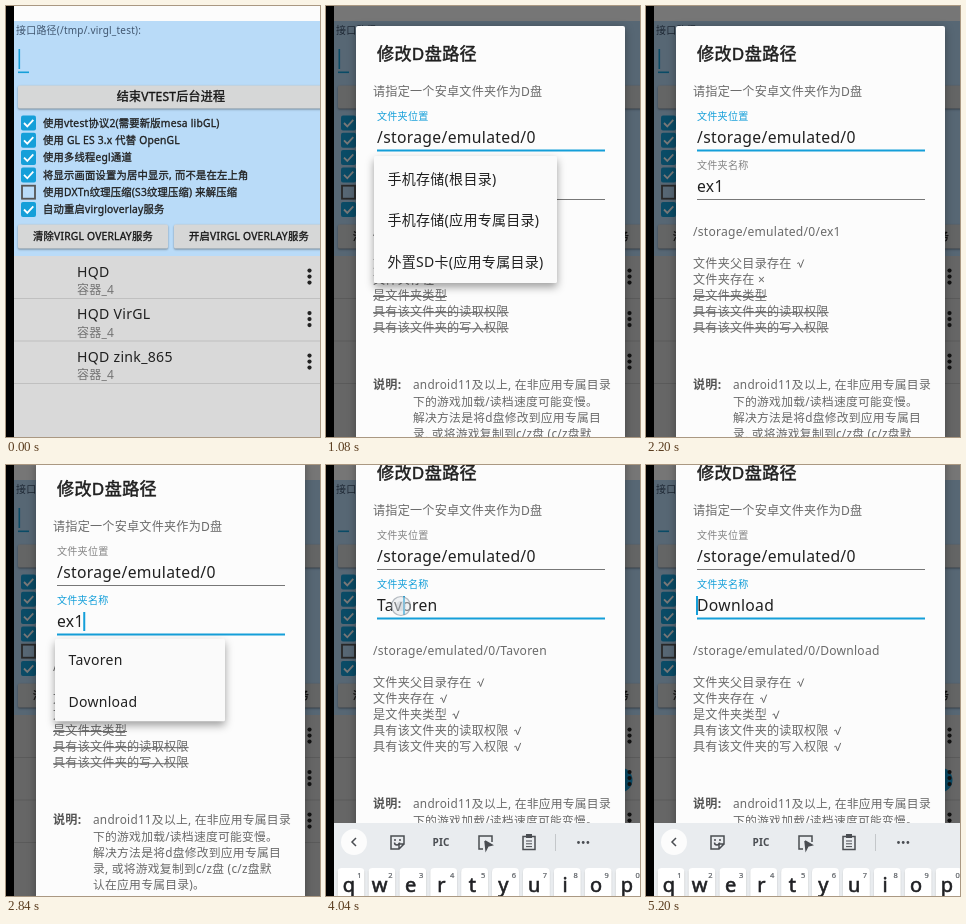
Write an HTML page with a canvas that moves like this. It is 314x431 px and loops after 5360 ms.

```html
<!DOCTYPE html>
<html lang="zh-CN">
<head>
<meta charset="utf-8">
<title>D盘路径</title>
<style>
html, body { margin: 0; width: 100%; height: 100%; overflow: hidden; background: #000; }
canvas { display: block; width: 314px; height: 431px; }
</style>
</head>
<body>
<canvas id="stage"></canvas>
<script>
const W = 314, H = 431, LOOP = 5360, STEP = 40;
const FONT = '"Noto Sans", "Noto Sans CJK SC", "Noto Sans CJK", sans-serif';
const BLUE = '#159fd9', INK = '#202020', GRAY = '#6a6a6a';
const FOLDER = 'Tavoren';
const canvas = document.getElementById('stage');
const dpr = window.devicePixelRatio || 1;
canvas.width = W * dpr;
canvas.height = H * dpr;
const c = canvas.getContext('2d');

const ramp = (t, from, to) => Math.min(1, Math.max(0, (t - from) / (to - from)));
const during = (t, from, to) => t >= from && t < to;

function rect(x, y, w, h, color) {
  c.fillStyle = color;
  c.fillRect(x, y, w, h);
}

function round(x, y, w, h, r, color) {
  c.beginPath();
  c.roundRect(x, y, w, h, r);
  c.fillStyle = color;
  c.fill();
}

function disc(x, y, r, color) {
  c.beginPath();
  c.arc(x, y, r, 0, Math.PI * 2);
  c.fillStyle = color;
  c.fill();
}

function path(points, color, width) {
  c.beginPath();
  points.forEach(([x, y]) => c.lineTo(x, y));
  c.strokeStyle = color;
  c.lineWidth = width;
  c.stroke();
}

// y is the visual middle of the line; weight 500 is thickened by a thin outline
function text(str, x, y, size, color = INK, align = 'left', weight = 400) {
  const base = y + size * 0.37;
  c.font = `${weight} ${size}px ${FONT}`;
  c.letterSpacing = size * 0.02 + 'px';
  c.textAlign = align;
  c.fillStyle = color;
  c.fillText(str, x, base);
  if (weight === 500) {
    c.strokeStyle = color;
    c.lineWidth = size * 0.03;
    c.strokeText(str, x, base);
  }
  return c.measureText(str).width;
}

function shadow(blur, dy, alpha) {
  c.shadowColor = `rgba(0,0,0,${alpha})`;
  c.shadowBlur = blur * dpr;
  c.shadowOffsetY = dy * dpr;
}

function noShadow() {
  c.shadowColor = 'transparent';
}

function button(x, y, w, h, label, size) {
  shadow(2, 1, 0.4);
  round(x, y, w, h, 1.5, '#d6d7d7');
  noShadow();
  text(label, x + w / 2, y + h / 2, size, '#161616', 'center', 500);
}

function checkbox(y, on, label) {
  if (on) {
    round(15, y - 7.5, 15, 15, 2, BLUE);
    path([[18, y], [21.3, y + 3.4], [27.3, y - 3.2]], '#fff', 1.8);
  } else {
    c.strokeStyle = '#555';
    c.lineWidth = 1.8;
    c.strokeRect(16, y - 6.5, 13, 13);
  }
  text(label, 37, y, 10.3, INK, 'left', 500);
}

function drawPage(t) {
  rect(0, 0, W, H, '#000');
  rect(8, 0, W, 15, '#fcfcfc');
  rect(8, 15, W, 235, '#b9dbf8');
  rect(8, 250, W, H, '#d9d9d9');
  text('接口路径(/tmp/.virgl_test):', 10, 24, 10, '#40566f');
  if (t < 3000) rect(12.5, 43, 1.6, 20, BLUE);
  rect(12, 65.5, 11, 1.6, BLUE);
  button(12, 79.5, 306, 23, '结束VTEST后台进程', 12);
  [
    '使用vtest协议2(需要新版mesa libGL)',
    '使用 GL ES 3.x 代替 OpenGL',
    '使用多线程egl通道',
    '将显示画面设置为居中显示, 而不是在左上角',
    '使用DXTn纹理压缩(S3纹理压缩) 来解压缩',
    '自动重启virgloverlay服务'
  ].forEach((label, i) => checkbox(117 + i * 17.3, i !== 4, label));
  button(12, 218.5, 150, 24, '清除VIRGL OVERLAY服务', 10.3);
  button(168, 218.5, 150, 24, '开启VIRGL OVERLAY服务', 10.3);
  if (t >= 3080) disc(294, 315, 12.5, BLUE);
  ['HQD', 'HQD VirGL', 'HQD zink_865'].forEach((name, i) => {
    const y = 265.6 + i * 42.5;
    text(name, 71, y, 14.1);
    text('容器_4', 71, y + 18, 12, '#757575');
    rect(8, y + 26.4, W, 1, '#c0c0c0');
    for (let k = -1; k < 2; k++) disc(303.5, y + 5 + k * 6, 2.1, '#222');
  });
}

function field(label, value, y, focused) {
  text(label, 51, y - 21.5, 10.1, focused ? BLUE : '#858585');
  const w = text(value, 51, y, 15.7);
  if (focused) rect(51, y + 12, 228, 2, BLUE);
  else rect(51, y + 12.5, 228, 1, '#777');
  return 51 + w;
}

function tick(x, y) {
  path([[x, y], [x + 1.7, y - 0.8], [x + 3.4, y + 4], [x + 6.5, y - 4]], GRAY, 1);
}

function drawDialog(t, pan) {
  const folder = t < 3640 ? 'ex1' : t < 4960 ? FOLDER : 'Download';
  const exists = folder !== 'ex1';
  const second = t >= 2440;
  c.save();
  c.translate(0, -pan);
  shadow(8, 2, 0.35);
  round(30, 20, 269, 520, 2, '#fcfcfc');
  noShadow();
  text('修改D盘路径', 51, 48, 17.1, INK, 'left', 500);
  text('请指定一个安卓文件夹作为D盘', 47, 86, 12.1, GRAY);
  field('文件夹位置', '/storage/emulated/0', 131.5, !second);
  const end = field('文件夹名称', folder, 180.5, second);

  let caret = 0;
  if (during(t, 2440, 2960)) caret = end + 0.5;
  if (during(t, 3960, 4480)) caret = 78;
  if (t >= 4960) caret = 51;
  if (caret) rect(caret - 1, 171, 2, 19, BLUE);

  text('/storage/emulated/0/' + folder, 47, 225.5, 12.1, GRAY);
  [
    '文件夹父目录存在', '文件夹存在', '是文件夹类型',
    '具有该文件夹的读取权限', '具有该文件夹的写入权限'
  ].forEach((label, i) => {
    const y = 257.5 + i * 16.1;
    const missing = !exists && i === 1;
    const struck = !exists && i > 1;
    const w = text(label + (missing ? ' ×' : ''), 47, y, 12.1, GRAY);
    if (struck) rect(47, y + 0.3, w, 1, GRAY);
    else if (!missing) tick(47 + w + 5.5, y);
  });
  text('说明:', 47, 379, 12.1, '#555', 'left', 700);
  [
    'android11及以上, 在非应用专属目录',
    '下的游戏加载/读档速度可能变慢。',
    '解决方法是将d盘修改到应用专属目',
    '录, 或将游戏复制到c/z盘 (c/z盘默',
    '认在应用专属目录)。'
  ].forEach((line, i) => text(line, 87, 379 + i * 16.2, 11.8, GRAY));
  c.restore();
}

// Dropdown: drops in behind a widening clip, fades out after a row is pressed
function drawPopup(t, m) {
  if (!during(t, m.open, m.close + 240)) return;
  const p = ramp(t, m.open, m.open + 300);
  const rowH = 41.7, h = m.items.length * rowH + 2;
  const dx = 10 * (1 - p), dy = -92 * (1 - p) ** 2;
  const half = h / 2 * Math.min(1, 0.55 + 0.52 * p);
  c.save();
  c.globalAlpha = Math.min(1, p * 2) * (1 - ramp(t, m.close, m.close + 240));
  c.translate(m.x + dx, m.y + dy);
  shadow(9, 4, 0.38);
  round(0, h / 2 - half, m.w, half * 2, 1.5, '#fafafa');
  noShadow();
  c.beginPath();
  c.rect(0, h / 2 - half, m.w, half * 2);
  c.clip();
  const press = ramp(t, m.press - 80, m.press + 160);
  if (press > 0) {
    const top = 2 + m.row * rowH;
    c.save();
    c.beginPath();
    c.roundRect(9, top, m.w - 19, rowH - 1, 3);
    c.clip();
    rect(0, top, m.w, rowH, '#d2d2d2');
    disc(50, top + rowH / 2, 130 * press, '#c8c8c8');
    c.restore();
  }
  m.items.forEach((item, i) => text(item, 13.5, 22.5 + i * rowH, 14));
  c.restore();
}

const places = {
  x: 48, y: 150, w: 183, open: 170, press: 1400, close: 1560, row: 0,
  items: ['手机存储(根目录)', '手机存储(应用专属目录)', '外置SD卡(应用专属目录)']
};
const folders = { x: 47, y: 200, w: 170, items: [FOLDER, 'Download'] };
const popups = [
  places,
  { ...folders, open: 2600, press: 3560, close: 3640, row: 0 },
  { ...folders, open: 4200, press: 4880, close: 4960, row: 1 }
];

function drawKeyboard(shown) {
  if (!shown) return;
  const ink = '#4a4d52';
  c.save();
  c.translate(0, (1 - shown) * 73);
  rect(8, 358, W, 80, '#e9ecef');
  disc(28, 377, 13, '#fcfcfc');
  path([[30, 373], [26, 377], [30, 381]], ink, 1.5);

  // Sticker with a folded corner
  path([[78, 379], [73, 384], [65, 384], [65, 371], [78, 371], [78, 379], [73, 379], [73, 384]], ink, 1.5);
  disc(69, 375, 1, ink);
  disc(74, 375, 1, ink);
  c.beginPath();
  c.arc(71, 377.5, 2.5, 0, Math.PI);
  c.stroke();

  text('PIC', 115, 377.5, 10, ink, 'center', 700);

  path([[157, 384], [153, 384], [153, 371], [166, 371], [166, 377]], ink, 1.5);
  path([[159, 376], [166, 380], [162, 381], [160, 385], [159, 376]], ink, 1.5);
  c.fill();

  c.strokeRect(197, 371.5, 12, 13);
  rect(200, 369, 6, 4, ink);
  for (let i = 0; i < 3; i++) {
    rect(200, 375.5 + i * 2.8, 6, 1, ink);
    disc(252.5 + i * 4.7, 377.5, 1.4, ink);
  }
  rect(229, 369, 1, 17, '#c4c7ca');

  [...'qwertyuiop'].forEach((key, i) => {
    const x = 24 + i * 30.9;
    shadow(1, 1, 0.3);
    round(x - 12.5, 403, 27, 40, 4, '#fff');
    noShadow();
    text(key, x - 1, 419.5, 20, '#202124', 'center', 500);
    text(String((i + 1) % 10), x + 9.5, 410, 7.5, '#5f6368', 'center', 500);
  });
  c.restore();
}

function drawTouch(t) {
  [[3400, 3560, 87, 185], [3960, 4160, 75, 141], [4560, 4720, 88, 224]]
    .forEach(([from, to, x, y]) => {
      if (!during(t, from, to)) return;
      disc(x, y, 9.5, 'rgba(225,230,234,0.5)');
      c.strokeStyle = 'rgba(135,145,155,0.6)';
      c.lineWidth = 1.2;
      c.stroke();
      disc(x, y, 5, 'rgba(170,180,190,0.3)');
    });
}

function draw(now) {
  const t = Math.floor((now % LOOP) / STEP) * STEP;
  const fade = ramp(t, 40, 200);
  const keys = ramp(t, 2920, 3160);
  const pan = 24 * ramp(t, 2600, 2840) + 16 * keys;
  c.setTransform(dpr, 0, 0, dpr, 0, 0);
  c.globalAlpha = 1;
  drawPage(t);
  if (fade === 0) return;
  rect(8, 0, W, H, `rgba(0,0,0,${0.53 * fade})`);
  c.globalAlpha = fade;
  drawDialog(t, pan);
  c.globalAlpha = 1;
  c.save();
  c.translate(0, -pan);
  popups.forEach(m => drawPopup(t, m));
  c.restore();
  drawKeyboard(keys);
  drawTouch(t);
}

const start = performance.now();
function frame() {
  draw(performance.now() - start);
  requestAnimationFrame(frame);
}
frame();
</script>
</body>
</html>
```
